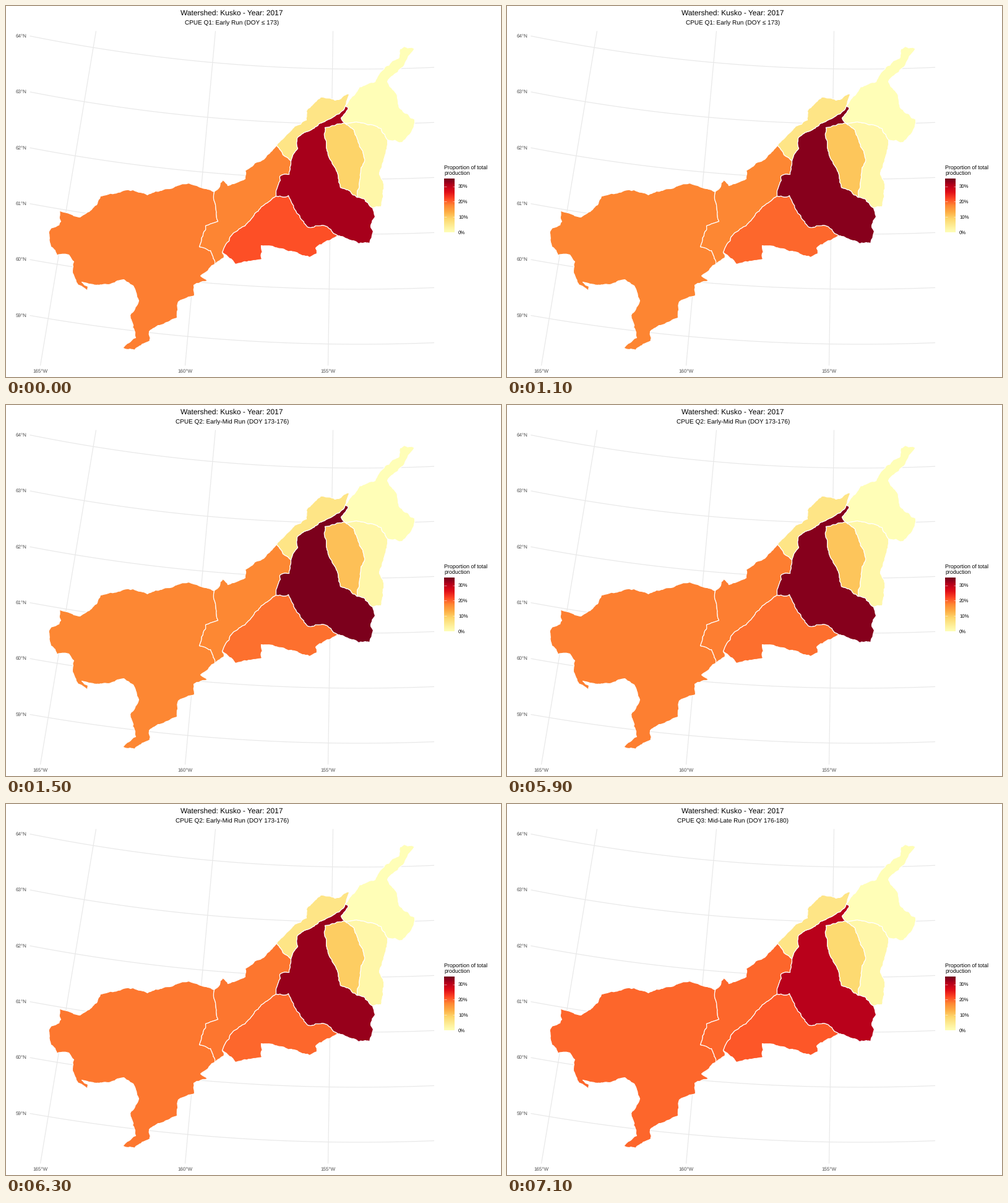
These frames come from a looping animation (800x600 px, 8 s). A matplotlib script:

```python
import numpy as np
import matplotlib.pyplot as plt
from matplotlib.animation import FuncAnimation
from matplotlib.colors import LinearSegmentedColormap
from matplotlib.patches import Polygon

W, H, DPI = 800, 600, 100
PX = 72 / DPI
STEP, LOOP = 100, 8000

plt.rcParams["font.family"] = "Liberation Sans"
plt.rcParams["text.hinting"] = "none"

CMAP = LinearSegmentedColormap.from_list("heat", [
    "#ffffb9", "#feec94", "#fdd76c", "#fdae45", "#fd8733",
    "#fd4524", "#e00e18", "#b7001b", "#70001c"], N=1024)

rng = np.random.default_rng(7)


def roughen(a, b):
    """Points from a up to, not including, b by midpoint displacement."""
    size = np.hypot(*(b - a))
    if size < 4:
        return [a]
    mid = (a + b) / 2 + rng.normal(0, min(0.07 * size, 0.9), 2)
    return roughen(a, mid) + roughen(mid, b)


def arc(*flat):
    keys = np.array(flat, float).reshape(-1, 2)
    pts = [p for a, b in zip(keys, keys[1:]) for p in roughen(a, b)]
    return np.array(pts + [keys[-1]])


def ring(*arcs):
    """Chain arcs into one outline, turning those that run the other way."""
    out = arcs[0]
    for part in arcs[1:]:
        flip = np.allclose(out[-1], part[-1])
        out = np.vstack([out, part[::-1] if flip else part])
    return out


# Outer edges and shared borders, each from a few key points
lower_coast = arc(
    336, 300, 295, 286, 228, 305, 205, 297, 152, 307, 146, 321, 134, 332,
    119, 341, 86, 331, 88, 348, 69, 364, 72, 389, 82, 403, 101, 402,
    109, 413, 107, 431, 113, 446, 131, 460, 132, 453, 122, 446, 150, 451,
    190, 442, 205, 452, 214, 476, 200, 500, 209, 536, 188, 553, 207, 556,
    232, 541, 231, 526, 276, 504, 278, 478, 304, 468, 303, 451, 325, 444,
    314, 436, 337, 417)
lower_middle = arc(336, 300, 335, 311, 342, 348, 322, 355, 312, 389,
                   330, 395, 337, 417)
middle_foot = arc(337, 417, 352, 406, 349, 398)
middle_south = arc(349, 398, 368, 366, 386, 355, 403, 334, 436, 307)
middle_core = arc(436, 307, 442, 275, 457, 272, 460, 250)
middle_ridge = arc(460, 250, 447, 240, 437, 225)
middle_north = arc(437, 225, 421, 241, 386, 266, 386, 279, 358, 290,
                   350, 281, 336, 300)
ridge_north = arc(437, 225, 466, 194, 485, 184, 487, 166, 508, 147,
                  531, 152, 554, 142, 548, 161)
ridge_core = arc(548, 161, 538, 174, 499, 195, 470, 213, 471, 230, 460, 250)
core_head = arc(548, 161, 553, 164, 541, 181, 547, 189)
core_fork = arc(547, 189, 515, 196, 514, 209, 520, 240, 532, 262, 540, 293,
                556, 299, 567, 309)
core_east = arc(567, 309, 578, 311, 592, 326)
core_edge = arc(592, 326, 596, 340, 589, 357, 593, 364, 587, 384, 570, 384,
                536, 371)
core_south = arc(536, 371, 518, 356, 487, 357, 470, 335, 456, 306, 436, 307)
south_edge = arc(536, 371, 512, 383, 500, 391, 502, 400, 490, 406, 465, 397,
                 430, 388, 412, 387, 413, 409, 370, 417, 349, 398)
fork_east = arc(547, 189, 562, 200, 576, 234, 579, 251, 573, 264, 567, 309)
head_east = arc(547, 189, 566, 187, 606, 198, 616, 216)
east_edge = arc(616, 216, 611, 245, 603, 272, 609, 283, 606, 324, 592, 326)
head_edge = arc(548, 161, 570, 131, 596, 122, 612, 98, 634, 84, 636, 69,
                643, 65, 660, 69, 637, 101, 616, 122, 632, 148, 636, 165,
                660, 183, 655, 203, 640, 220, 616, 216)

SHAPES = {
    "lower": ring(lower_coast, lower_middle),
    "middle": ring(lower_middle, middle_foot, middle_south, middle_core,
                   middle_ridge, middle_north),
    "south": ring(middle_south, core_south, south_edge),
    "core": ring(ridge_core, middle_core, core_south, core_edge, core_east,
                 core_fork, core_head),
    "fork": ring(core_fork, fork_east),
    "ridge": ring(ridge_north, ridge_core, middle_ridge),
    "east": ring(fork_east, core_east, east_edge, head_east),
    "head": ring(head_edge, head_east, core_head),
}

# Palette position (0 to 8) of each region at the start, hold and end
RAMP = [0, 1900, 5400, 7100]
LEVELS = {
    "lower": (4.13, 3.96, 4.50),
    "middle": (4.03, 3.97, 4.50),
    "south": (4.85, 4.22, 4.72),
    "core": (7.22, 8.00, 6.95),
    "fork": (2.08, 2.68, 1.88),
    "ridge": (1.35, 1.35, 1.35),
    "east": (0.45, 0.45, 0.45),
    "head": (0.05, 0.05, 0.05),
}
CHANGES = [0, 500, 1100, 1500, 1900, 5900, 6300, 6500, 6700, 7100]
SUBTITLES = {
    0: "CPUE Q1: Early Run (DOY \u2264 173)",
    1500: "CPUE Q2: Early-Mid Run (DOY 173-176)",
    6500: "CPUE Q3: Mid-Late Run (DOY 176-180)",
}

fig = plt.figure(figsize=(W / DPI, H / DPI), dpi=DPI, facecolor="white")
ax = fig.add_axes([0, 0, 1, 1])


def label(x, y, text, size, color="black", ha="left"):
    return ax.text(x, y, text, fontsize=size * PX, color=color, ha=ha,
                   va="baseline")


def line(x, y, color, width, z):
    ax.plot(x, y, color=color, lw=width * PX, zorder=z, solid_capstyle="butt")


# Graticule
x = np.linspace(38, 691.5, 120)
for i in range(6):
    low = 101.5 + 89 * i
    drop = 53.5 - 1.4 * i
    line(x, low - drop * ((x - 570) / 532) ** 2, "#e8e8e8", 1.2, 1)
    label(33, low - drop + 2.3, f"{64 - i}\u00b0N", 8, "#4d4d4d", "right")
for deg, top, bottom in [(165, 145, 55), (160, 338, 289), (155, 528, 520)]:
    line([top, bottom], [40, 581], "#e8e8e8", 1.2, 1)
    label(bottom, 592.3, f"{deg}\u00b0W", 8, "#4d4d4d", "center")

patches = {name: ax.add_patch(Polygon(pts, edgecolor="white", lw=1.2 * PX,
                                      joinstyle="round", zorder=2))
           for name, pts in SHAPES.items()}

# Legend
ax.imshow(np.linspace(1, 0, 256)[:, None], cmap=CMAP, aspect="auto",
          extent=(707.5, 724.5, 365.5, 278.5), zorder=2, vmin=0, vmax=1)
for i in range(4):
    y = 365.5 - 24.8 * i
    line([707.5, 711], [y, y], "white", 0.5, 3)
    line([721, 724.5], [y, y], "white", 0.5, 3)
    label(730.5, y + 2.8, f"{10 * i}%", 7.8)
label(707.5, 264, "Proportion of total", 8.9)
label(707.5, 273, "production", 8.9)

label(364.5, 14.3, "Watershed: Kusko - Year: 2017", 12, ha="center")
subtitle = label(364.8, 29.3, "", 10, ha="center")

ax.set_xlim(-0.5, W - 0.5)
ax.set_ylim(H - 0.5, -0.5)
ax.axis("off")


def update(frame):
    shown = max(t for t in CHANGES if t <= frame * STEP)
    for name, (start, hold, end) in LEVELS.items():
        level = np.interp(shown, RAMP, [start, hold, hold, end])
        patches[name].set_facecolor(CMAP(level / 8))
    subtitle.set_text(SUBTITLES[max(t for t in SUBTITLES if t <= shown)])
    return [*patches.values(), subtitle]


anim = FuncAnimation(fig, update, frames=LOOP // STEP, interval=STEP,
                     repeat=True, repeat_delay=0, blit=False)
plt.show()
```
